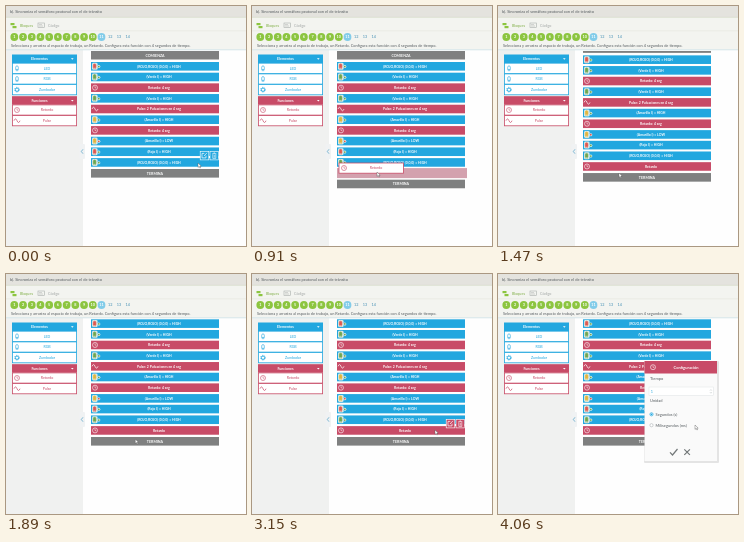
These frames come from a looping animation (240 px wide and 240 px high, 4.13 s). An HTML page:

```html
<!DOCTYPE html>
<html lang="es">
<head>
<meta charset="utf-8">
<style>
html, body { margin: 0; width: 100%; height: 100%; overflow: hidden; background: #f0f1f0; }
svg { display: block; width: 100vw; height: 100vh; }
text { font-family: Lato, "Open Sans", sans-serif; }
</style>
</head>
<body>
<svg viewBox="0 0 240 240">
  <defs>
    <clipPath id="work"><rect x="83" y="45" width="157" height="195"/></clipPath>
  </defs>
  <g id="page"></g>
  <g id="blocks" clip-path="url(#work)"></g>
  <g id="modal"></g>
  <path id="cursor" d="M0 0V4.4L1.1 3.4 1.9 5 2.6 4.7 1.8 3.1H3.2Z" fill="#fff" stroke="#555" stroke-width=".4"/>
</svg>
<script>
const BLUE = '#22a7df', RED = '#c84b67', GREY = '#7f8080', GREEN = '#8cc540', INK = '#555b5f';
const LOOP = 4130, STEP = 70, PITCH = 10.68, FIRST = 60.3;
const $ = id => document.getElementById(id);

const rect = (x, y, w, h, fill, more = '') =>
  `<rect x="${x}" y="${y}" width="${w}" height="${h}" fill="${fill}" ${more}/>`;
const text = (s, x, y, size, fill, anchor = 'middle', weight = 400) =>
  `<text x="${x}" y="${y}" font-size="${size}" fill="${fill}" text-anchor="${anchor}" font-weight="${weight}">${s}</text>`;
const line = (d, color, width = .6) =>
  `<path d="${d}" fill="none" stroke="${color}" stroke-width="${width}"/>`;
const dot = (x, y, r, fill, more = '') => `<circle cx="${x}" cy="${y}" r="${r}" fill="${fill}" ${more}/>`;
const clock = (x, y, c) =>
  dot(x, y, 2.5, 'none', `stroke="${c}" stroke-width=".6"`) + line(`M${x} ${y - 1.5}v1.7h1.3`, c, .5);
const wave = (x, y, c) => line(`M${x - 3} ${y}q1.5 -3.6 3 0t3 0`, c, .7);
const bulb = (x, y, c, fill = 'none') =>
  `<path d="M${x - 1.3} ${y + 1.3}v-2.4a1.3 1.3 0 0 1 2.6 0v2.4zM${x - .7} ${y + 1.3}v1.6M${x + .7} ${y + 1.3}v1.6" fill="${fill}" stroke="${c}" stroke-width=".6"/>`;
const gear = (x, y, c) =>
  dot(x, y, 1.7, 'none', `stroke="${c}" stroke-width=".9"`) +
  dot(x, y, 2.4, 'none', `stroke="${c}" stroke-width=".7" stroke-dasharray=".94 .94"`);

function panel(title, y, color, rows) {
  let s = rect(6, y, 65, 8.5, color) + text(title, 33.5, y + 5.5, 3.6, '#fff', 'middle', 700) +
    `<path d="M65 ${y + 3.7}h2.6l-1.3 1.5z" fill="#fff"/>`;
  rows.forEach(([label, icon], i) => {
    const top = y + 8.7 + i * 10.7;
    s += rect(6.4, top, 64.2, 10.2, '#fff', `stroke="${color}" stroke-width=".8"`) +
      icon(11, top + 5.1, color) + text(label, 41, top + 6.3, 3.6, color);
  });
  return s;
}

function page() {
  let s = rect(0, 0, 240, 11, '#e4e3de') + rect(0, 11, 240, 33, '#f3f4f0') + rect(77, 44, 163, 196, '#fefefe') +
    line('M0 11.3H240', '#d5dac6', .7) + line('M0 43.8H240', '#cfe3ea', .8) +
    text('b). Sincroniza el semáforo peatonal con el de tránsito', 4, 7.4, 4, INK, 'start') +
    rect(4.5, 17, 4, 2.2, GREEN) + rect(6.5, 20, 4, 2.2, GREEN) +
    text('Bloques', 14, 21.2, 3.7, '#7fae45', 'start') +
    rect(32, 17, 6.5, 4.5, 'none', 'stroke="#a8adab" stroke-width=".6"') +
    line('M33 18.6h3M33 20h4', '#a8adab', .5) + text('Código', 42, 21.2, 3.7, '#a0a5a4', 'start') +
    line('M0 24.8H240', '#dfe2d8', .5);
  for (let n = 1; n <= 14; n++) {
    const x = 8.3 + (n - 1) * 8.72;
    if (n < 12) s += dot(x, 31, 3.9, n < 11 ? GREEN : '#82cce9');
    s += text(n, x, 32.3, 3.8, n < 12 ? '#fff' : '#6ba6c2', 'middle', 700);
  }
  return s +
    text('Selecciona y arrastra al espacio de trabajo, un Retardo. Configura esta función con 4 segundos de tiempo.',
      5, 41.4, 3.92, INK, 'start') +
    panel('Elementos', 48.5, BLUE, [['LED', bulb], ['RGB', bulb], ['Zumbador', gear]]) +
    panel('Funciones', 90.2, RED, [['Retardo', clock], ['Pulse', wave]]) +
    rect(73.5, 138, 5.5, 15, '#f0f2f3', 'rx="1"') + line('M77 143.3l-1.7 2.2 1.7 2.2', '#4f9fc4', .7);
}

// label, then lamp colour for blue blocks or an icon for red ones
const lamp = ['#e0584f', '#6fa650', '#e2b63c'];
const walk = '(ROJO,ROJO) (0,0,0) = HIGH';
const program = [
  [walk, lamp[0]], ['(Verde I) = HIGH', lamp[1]], ['Retardo: 4 seg', clock], ['(Verde I) = HIGH', lamp[1]],
  ['Pulse: 2 Pulsaciones en 4 seg', wave], ['(Amarillo I) = HIGH', lamp[2]], ['Retardo: 4 seg', clock],
  ['(Amarillo I) = LOW', lamp[2]], ['(Rojo I) = HIGH', lamp[0]], [walk, lamp[1]]
];
const delay = ['Retardo', clock];

const bar = (y, fill, label) =>
  rect(85, y - 4.3, 128, 8.6, fill) + text(label, 149, y + 1.3, 3.6, '#fff', 'middle', 700);

function block([label, icon], y) {
  const red = typeof icon === 'function';
  let s = rect(85, y - 4.3, 128, 8.6, red ? RED : BLUE) + text(label, 153, y + 1.2, 3.45, '#fff', 'middle', 700);
  if (red) return s + icon(89, y, '#fff');
  return s + rect(86, y - 3.5, 5.6, 7, '#dbe8e4', 'rx="1.4"') + bulb(88.6, y, icon, icon) +
    dot(92.8, y + .3, 1.5, '#e4f2f5') + dot(92.8, y + .3, .9, label.endsWith('LOW') ? lamp[0] : lamp[1]);
}

const tools = (y, fill) =>
  [194.2, 204].map(x => rect(x, y - 4.3, 8.6, 8.6, fill, 'stroke="#fff" stroke-width=".6"')).join('') +
  line(`M200 ${y}v2.3h-4v-4.5h2.3M198 ${y + .4}l3 -3.2`, '#fff', .7) +
  line(`M206.3 ${y - 2}h4M207.6 ${y - 2.7}h1.4M206.8 ${y - 1.4}v4.2h3v-4.2M208.3 ${y - .8}v2.8`, '#fff', .6);

function dialog() {
  return rect(146, 87, 75, 102, '#000', 'opacity=".1" rx="1"') + rect(146.5, 87, 72.5, 100, '#fafafa') +
    rect(146.5, 87, 72.5, 12.5, RED) + clock(155, 93.2, '#fff') +
    text('Configuración', 188, 94.5, 4, '#fff', 'middle', 700) +
    text('Tiempo', 152, 106.3, 4, INK, 'start') +
    rect(151, 113, 64.5, 8.6, '#fff', 'stroke="#dde1e3" stroke-width=".5"') +
    text('1', 152.8, 118.7, 3.8, BLUE, 'start') +
    line('M212 116.6l.9 -1 .9 1M212 118.2l.9 1 .9 -1', '#a0a6a9', .4) +
    text('Unidad', 152, 127.8, 4, INK, 'start') +
    dot(153.5, 140.3, 1.6, '#fff', `stroke="${BLUE}" stroke-width=".7"`) + dot(153.5, 140.3, .9, BLUE) +
    dot(153.5, 151.2, 1.6, '#fff', 'stroke="#9da3a6" stroke-width=".5"') +
    text('Segundos (s)', 157.5, 141.7, 4, INK, 'start') + text('Milisegundos (ms)', 157.5, 152.6, 4, INK, 'start') +
    line('M172 178.3l2.5 2.7 5 -6M186.3 175.3l5.6 5.6M191.9 175.3l-5.6 5.6', '#737879', 1.2);
}

// time, x, y
const path = [
  [0, 192, 157], [70, 190, 156], [210, 44, 108], [490, 111, 141], [630, 114, 144], [910, 125, 166],
  [1120, 122, 169], [1470, 121, 167], [1750, 123, 166], [2240, 145, 163], [2450, 152, 155],
  [3150, 183, 156], [3360, 199, 150], [3570, 199, 150], [4060, 197, 151]
];
const clamp = v => Math.max(0, Math.min(1, v));
function pointer(t) {
  const i = Math.max(1, path.findIndex(p => p[0] >= t));
  const [a, b] = [path[i - 1], path[i]];
  const k = clamp((t - a[0]) / (b[0] - a[0]));
  return [a[1] + (b[1] - a[1]) * k, a[2] + (b[2] - a[2]) * k];
}

function draw(t) {
  const [x, y] = pointer(t);
  const dragging = t >= 210 && t < 1120;
  const left = x - 38, top = y - 9;
  const scroll = PITCH * clamp((t - 1290) / 290);
  const list = program.slice();
  if (dragging && x > 83) {
    const slot = Math.round((top + 5 - FIRST) / PITCH);
    list.splice(Math.max(0, Math.min(10, slot)), 0, null);
  } else if (t >= 1120) list.push(delay);

  let s = bar(49.2 - scroll, GREY, 'COMIENZA');
  list.forEach((item, i) => {
    const cy = FIRST + i * PITCH - scroll;
    s += item ? block(item, cy) : rect(85, cy - 5, 130, 10, '#d3a1ae');
  });
  s += bar(FIRST + list.length * PITCH - scroll + .2, GREY, 'TERMINA');
  if (t < 100) s += tools(149.6, BLUE);
  if (t >= 2520) s += tools(149.6, RED);
  if (dragging) s += rect(left, top, 64.4, 10.2, '#fff', `stroke="${RED}" stroke-width=".8"`) +
    clock(left + 5, top + 5, RED) + text('Retardo', left + 37, top + 6.2, 3.6, RED);
  $('blocks').innerHTML = s;
  $('modal').innerHTML = t >= 3570 ? dialog() : '';
  $('cursor').setAttribute('transform', `translate(${x} ${y})`);
}

$('page').innerHTML = page();
const start = performance.now();
function tick() {
  const t = (performance.now() - start) % LOOP;
  draw(Math.floor(t / STEP) * STEP);
  requestAnimationFrame(tick);
}
tick();
</script>
</body>
</html>
```
